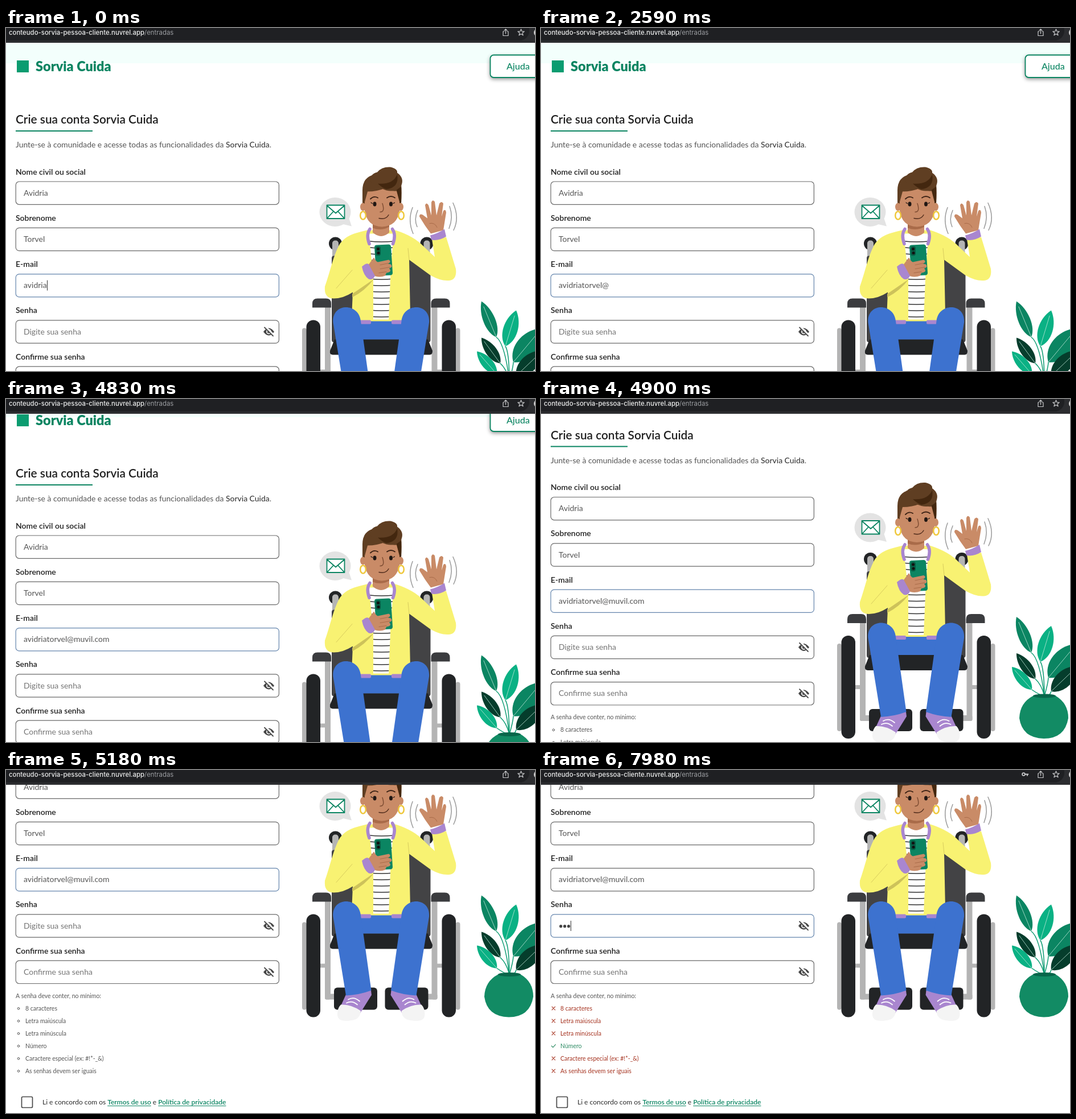
Animation of 929 by 603 pixels, one loop 8000 ms. Source, as an HTML page with a canvas:

```html
<!DOCTYPE html>
<html lang="pt-BR">
<head>
<meta charset="utf-8">
<title>Cadastro</title>
<style>
html, body { margin: 0; width: 100%; height: 100%; overflow: hidden; background: #fff; }
canvas { display: block; }
</style>
</head>
<body>
<canvas id="stage" width="929" height="603"></canvas>
<script>
const ctx = document.getElementById('stage').getContext('2d');
const LOOP = 8000, STEP = 70, BAR = 26, SCROLL_START = 4830;
const SCROLL = [30, 97.5, 170, 226, 250, 260];
const BRAND = 'Sorvia Cuida';
const EMAIL = 'avidriatorvel@muvil.com';
const EMAIL_KEYS = [420, 490, 700, 770, 1050, 1610, 2030, 2800, 3080, 3290, 3360, 3570, 3850, 3990, 4130, 4340];
const PASS_FOCUS = 5880, PASS_KEYS = [6370, 6650, 6860];
const RULES = ['8 caracteres', 'Letra maiúscula', 'Letra minúscula', 'Número',
  'Caractere especial (ex: #!*-_&)', 'As senhas devem ser iguais'];
const GREEN = '#0b8562', DARK = '#222426', GREY = '#b4b4b4', YELLOW = '#f8f272',
  PURPLE = '#a986cf', BLUE = '#3d72cf', SKIN = '#c98b67', HAIR = '#5f3e22', HAIR_DARK = '#43270f';

const pressed = (keys, t) => keys.filter(k => k <= t).length;
const between = (t, a, b) => t >= a && t < b;

function fill(color, path) {
  ctx.fillStyle = color;
  ctx.fill(new Path2D(path));
}
function line(color, width, path) {
  ctx.strokeStyle = color;
  ctx.lineWidth = width;
  ctx.lineCap = ctx.lineJoin = 'round';
  ctx.stroke(new Path2D(path));
}
function box(color, x, y, w, h, r = 0) {
  ctx.fillStyle = color;
  ctx.beginPath();
  ctx.roundRect(x, y, w, h, r);
  ctx.fill();
}
function frame(color, width, x, y, w, h, r) {
  ctx.strokeStyle = color;
  ctx.lineWidth = width;
  ctx.beginPath();
  ctx.roundRect(x, y, w, h, r);
  ctx.stroke();
}
function oval(color, x, y, rx, ry = rx, stroke = 0) {
  ctx.beginPath();
  ctx.ellipse(x, y, rx, ry, 0, 0, Math.PI * 2);
  ctx.fillStyle = ctx.strokeStyle = color;
  ctx.lineWidth = stroke;
  stroke ? ctx.stroke() : ctx.fill();
}
// Returns the x where the text ends.
function text(str, x, y, size, color, weight = 400, family = 'Lato') {
  ctx.font = `${weight} ${size}px ${family}, sans-serif`;
  ctx.fillStyle = color;
  ctx.fillText(str, x, y);
  return x + ctx.measureText(str).width;
}
function at(x, y, draw) {
  ctx.save();
  ctx.translate(x, y);
  draw();
  ctx.restore();
}
// Draws a part and its mirror image about the middle of the chair.
function both(draw) {
  draw();
  ctx.save();
  ctx.translate(1317.5, 0);
  ctx.scale(-1, 1);
  draw();
  ctx.restore();
}

function browserBar(t) {
  box('#2c2d30', 0, 0, 929, BAR);
  box('#1f2023', -20, -14, 939, 36, 17);
  const x = text('conteudo-sorvia-pessoa-cliente.nuvrel.app', 5, 12, 11.4, '#eceded', 500, 'Inter');
  text('/entradas', x, 12, 11.4, '#9b9da1', 400, 'Inter');
  line('#c9cacc', 1.2, 'M875 6H873V13.5H882V6H880M877.5 10V2M875 4.3L877.5 1.8L880 4.3');
  at(904.5, 8, () => {
    let star = '';
    for (let i = 0; i < 10; i++) {
      const a = i * Math.PI / 5 - Math.PI / 2, r = i % 2 ? 2.6 : 6;
      star += (i ? 'L' : 'M') + r * Math.cos(a) + ' ' + r * Math.sin(a);
    }
    line('#c9cacc', 1.2, star + 'Z');
  });
  oval('#dcdcdc', 934, 8, 7);
  if (t >= 6440) {
    oval('#c9cacc', 847.5, 7.5, 2.4, 2.4, 1.7);
    line('#c9cacc', 1.8, 'M850.5 7.5H855.5M854 7.5V9.8');
  }
}

function header() {
  box('#f3fffc', 0, BAR, 929, 36);
  box('#0b9c70', 19, 57, 21, 21);
  text(BRAND, 52, 76, 23.5, GREEN, 900);
  ctx.save();
  ctx.shadowColor = 'rgba(0,0,0,.45)';
  ctx.shadowBlur = 7;
  ctx.shadowOffsetY = 3;
  box('#fff', 850, 47, 110, 40, 6);
  ctx.restore();
  frame(GREEN, 1.8, 850.5, 47.5, 110, 39.5, 6);
  text('Ajuda', 879, 72.5, 16, GREEN, 500);

  text('Crie sua conta ' + BRAND, 17, 168, 20.8, '#1f1f1f', 600);
  box(GREEN, 17, 180, 135, 2);
  const x = text('Junte-se à comunidade e acesse todas as funcionalidades da ', 17, 210, 13.9, '#555');
  text('.', text(BRAND, x, 210, 13.9, '#3a3a3a', 500), 210, 13.9, '#555');
}

function hiddenEye(x, y) {
  at(x, y, () => {
    fill('#464646', 'M-9.5 0Q0 -13 9.5 0Q0 13 -9.5 0Z');
    oval('#fff', 0, 0, 4.4);
    oval('#464646', 0, 0, 2.7);
    line('#fff', 4.5, 'M-6 -8L8 6');
    line('#464646', 1.9, 'M-7.5 -7.5L7.5 7.5');
  });
}

function field(index, label, focused) {
  const y = 270 + index * 81.3;
  text(label, 17, y - 12.5, 14, '#1f1f1f', 600);
  frame(focused ? '#6485ad' : '#6a6a6a', 1.2, 17.2, y, 462.2, 40.3, 6);
  return y;
}
function caret(x, y) {
  box('#333', x, y + 11, 1, 18);
}

function form(t) {
  const value = (str, y) => text(str, 31, y + 24.7, 14, '#555');
  const hint = (str, y) => text(str, 31, y + 24.7, 14, '#757575');
  value('Avidria', field(0, 'Nome civil ou social'));
  value('Torvel', field(1, 'Sobrenome'));

  const emailY = field(2, 'E-mail', t < PASS_FOCUS);
  const end = value(EMAIL.slice(0, 7 + pressed(EMAIL_KEYS, t)), emailY);
  if (t < SCROLL_START && !between(t, 280, 420) && !between(t, 2590, 2800)) caret(Math.round(end), emailY);

  const passY = field(3, 'Senha', t >= PASS_FOCUS), dots = pressed(PASS_KEYS, t);
  if (!dots) hint('Digite sua senha', passY);
  for (let i = 0; i < dots; i++) oval('#444', 34.8 + i * 6.9, passY + 20.8, 2.6);
  if (t >= PASS_FOCUS && !between(t, 7420, 7980)) caret(Math.round(31 + dots * 7), passY);
  hiddenEye(461.5, passY + 20);

  const confirmY = field(4, 'Confirme sua senha');
  hint('Confirme sua senha', confirmY);
  hiddenEye(461.5, confirmY + 20);

  text('A senha deve conter, no mínimo:', 17, 660.5, 10.5, '#555');
  RULES.forEach((rule, i) => {
    const y = 679 + i * 22, met = i === 3;
    const color = !dots ? '#555' : met ? '#2c8a62' : '#a5321f';
    text(rule, 34, y + 3.5, 10.5, color);
    at(22, y, () => {
      if (!dots) oval(color, 0, 0.3, 1.8, 1.8, 1);
      else line(color, 1.1, met ? 'M-3.5 0L-1 2.6L3.5 -2.4' : 'M-2.8 -2.8L2.8 2.8M2.8 -2.8L-2.8 2.8');
    });
  });

  frame('#484848', 1.7, 27.5, 834.5, 19, 19, 2);
  const y = 848;
  const link = (str, x) => {
    const right = text(str, x, y, 12, GREEN, 600);
    box(GREEN, x, y + 2, right - x, 1);
    return right;
  };
  let x = text('Li e concordo com os ', 64, y, 12, '#2b2b2b');
  x = text(' e ', link('Termos de uso', x), y, 12, '#2b2b2b');
  link('Política de privacidade', x);
}

function chair() {
  both(() => {
    box(GREY, 520, 430, 8, 154, 4);
    box(GREY, 548, 503, 16, 7);
    box(GREY, 560, 390, 10, 176, 3);
    box(GREY, 560, 556, 24, 10, 3);
    box(DARK, 527.5, 416, 24.5, 181, 12);
    fill('#3b3c3f', 'M538 394V387Q538 378 547 378H562Q571 378 571 387V394Z');
    oval(DARK, 578.5, 281.5, 11.5);
    box(GREY, 573, 276, 11, 36, 5);
  });
  box('#434345', 572, 303, 173.5, 152, 4);
  fill(DARK, 'M577 450H741L749 470Q749 477 744 477H574Q568 477 569 470Z');
}

function body() {
  fill(BLUE, 'M612 410H706V450H612Z');
  fill(YELLOW, 'M634 258C611 264 597 266 585 284C574 305 569 332 560 357Q558 378 576 378Q592 378 609 367L607 412L620 418H699L710 406L708 310L745 337Q766 349 781 346Q792 343 790 326L773 270L748 274L753 305L735 288C722 274 706 265 684 258Z');
  fill('#cdc25a', 'M608 370L646 344Q630 365 608 376Z');
  line('#d8cc5e', 1, 'M608 328L580 360M708 310L706 290');
  box(PURPLE, 618, 416, 23, 7, 2);
  box(PURPLE, 677, 416, 23, 7, 2);

  const shirt = new Path2D('M637 264H681L676 320L672 415H645L645 340Z');
  ctx.save();
  ctx.clip(shirt);
  box('#fff', 630, 255, 60, 165);
  for (let y = 277; y < 415; y += 11) line('#333', 1.5, `M635 ${y}Q659 ${y + 3} 685 ${y}`);
  ctx.restore();
  fill(SKIN, 'M644 240H673V262Q659 275 644 262Z');
  fill('#a96b49', 'M644 247H673V252Q659 260 644 254Z');
  both(() => line(PURPLE, 5.5, 'M639 256Q632 266 638 282'));

  both(() => {
    box(DARK, 576, 545, 76, 39, 6);
    fill(PURPLE, 'M598 555L641 550L642 558L622 590Q606 578 588 577Z');
    fill('#f4f4f4', 'M588 575Q606 574 623 586Q622 602 604 603Q582 606 582 592Q582 581 588 575Z');
    line('#fff', 1.8, 'M601 566Q611 560 621 569M598 572Q608 567 617 575');
    fill(BLUE, 'M574.5 420C572 385 620 385 623 418L641.5 550Q620 558 597 559Z');
  });
}

function head() {
  fill(HAIR, 'M626 212V188Q626 164 648 160H688Q697 168 694 212Z');
  fill(HAIR_DARK, 'M686 182H694V210H686Z');
  oval(SKIN, 627, 217, 5, 7);
  oval(SKIN, 693, 217, 5, 7);
  fill(SKIN, 'M630 208L635 190Q652 190 666 184Q676 190 686 189L691 208V224Q687 251 660 252Q634 251 630 224Z');
  fill(HAIR, 'M641 174Q638 159 652 156Q660 146 675 147Q688 150 687 157Q700 166 694 180Q686 192 668 188Q655 184 650 178Z');
  fill(HAIR_DARK, 'M653 176Q680 178 687 160Q691 183 668 186Q660 183 653 176Z');
  oval('#efc83c', 627, 232, 4.8, 7, 2.5);
  oval('#efc83c', 694, 232, 4.8, 7, 2.5);
  line('#3a2114', 1.9, 'M640 203Q646 197 653 201M669 201Q676 196 683 201');
  oval('#201713', 647.5, 212, 3, 4);
  oval('#201713', 676, 212, 3, 4);
  line('#201713', 1.2, 'M643.5 211L641 209.5M680 211L682.5 209.5');
  line('#7c4b31', 1.4, 'M661 211Q666 226 657 226');
  line('#4d2a1b', 1.4, 'M655 237Q667 240 672 231');
}

function hands() {
  fill(GREEN, 'M651 284L672 283Q675 283 676 286L679 333Q679 336 676 337L655 338Q650 338 650 334L647 288Q647 284 651 284Z');
  box('#075d45', 649, 286, 9, 17, 4);
  oval('#111', 653.5, 291, 2.5);
  oval('#111', 654, 298, 2.5);
  fill(SKIN, 'M634 322L646 306Q650 313 653 314L672 310Q678 313 671 317L676 318Q680 323 673 325L675 328Q676 332 668 333L666 338Q654 343 642 336Z');
  line('#a96b49', 1, 'M657 319L672 316M657 326L674 323M655 333L668 331');
  fill(PURPLE, 'M625 322Q634 314 637 318L648 338Q645 346 637 344Q628 338 625 322Z');

  fill(SKIN, 'M746 264L736 250L726 234Q726 228 732 231L740 237L736 214Q738 208 742 214L747 232L747 209Q749 203 753 208L756 232L761 211Q765 206 768 211L765 234L768 224Q772 220 773 227L768 258Z');
  line('#a96b49', 1, 'M744 246Q753 244 757 253');
  fill(PURPLE, 'M745 267Q758 264 770 256L773 269Q761 277 747 275Z');
  line('#9a9a9a', 1.5, 'M714 218Q705 241 715 264M723 223Q716 239 722 252M779 216Q786 235 778 255M785 210Q797 236 786 258');
}

function mailBubble() {
  oval('#e3e3e3', 578, 226, 27.5, 25.5);
  fill('#e3e3e3', 'M602 236L607 251L590 247Z');
  box('#fff', 563, 214, 32, 24);
  line(GREEN, 1.8, 'M563.5 214H594.5V237.5H563.5ZM564 215L579 228L594 215M564 237L575 225M594 237L583 225');
}

function leaf(color, tipX, tipY, baseX, baseY, width) {
  const dx = baseX - tipX, dy = baseY - tipY, len = Math.hypot(dx, dy);
  const nx = -dy / len * width, ny = dx / len * width;
  const along = (k, side) => `${tipX + dx * k + nx * side} ${tipY + dy * k + ny * side}`;
  line('#0a9a70', 1.5, `M${baseX} ${baseY}Q${(baseX + 884) / 2 + 3} ${baseY + 10} 884 522`);
  fill(color, `M${tipX} ${tipY}C${along(.3, 1)} ${along(.8, 1)} ${baseX} ${baseY}C${along(.8, -1)} ${along(.3, -1)} ${tipX} ${tipY}Z`);
  line('#bfe8d8', .8, `M${along(.15, 0)}L${baseX} ${baseY}`);
}
function plant() {
  leaf(GREEN, 835, 383, 861, 446, 14);
  leaf('#0ab184', 896, 399, 877, 462, 17);
  leaf(GREEN, 941, 430, 891, 490, 24);
  leaf('#053d2c', 835, 447, 868, 492, 13);
  leaf('#0ab184', 827, 471, 862, 511, 13);
  leaf('#053d2c', 943, 469, 896, 514, 19);
  fill('#128b64', 'M864 522H904Q926 535 926 561Q920 597 883 597Q845 596 840 561Q841 534 864 522Z');
  oval('#08664a', 884, 522, 20, 3.5);
}

function render(t) {
  const step = Math.floor((t - SCROLL_START) / STEP);
  const scroll = step < 0 ? 0 : SCROLL[Math.min(step, SCROLL.length - 1)];
  box('#fff', 0, 0, 929, 603);
  at(0, -scroll, () => {
    header();
    form(t);
    ctx.translate(0, 97.5);
    chair();
    body();
    head();
    hands();
    mailBubble();
    plant();
  });
  browserBar(t);
}

const start = performance.now();
function tick() {
  render((performance.now() - start) % LOOP);
  requestAnimationFrame(tick);
}
tick();
</script>
</body>
</html>
```
